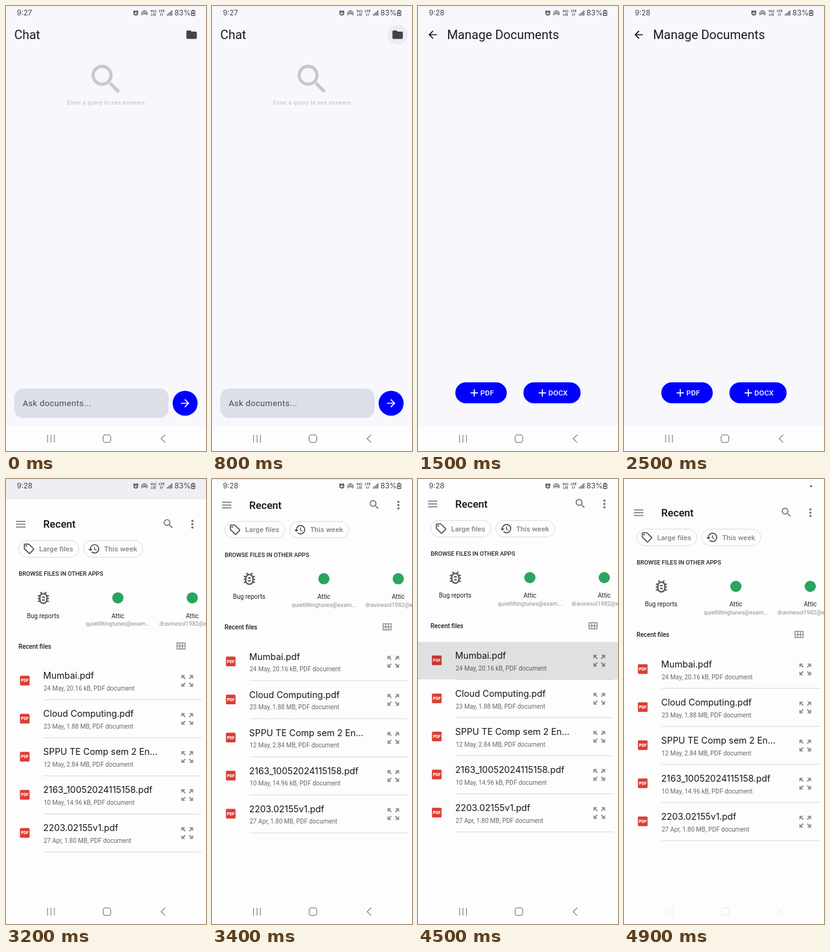
An HTML page with a canvas that plays this animation: 320 px wide and 713 px high, repeating every 5 s.

```html
<!DOCTYPE html>
<html lang="en">
<head>
<meta charset="utf-8">
<title>Document chat</title>
<style>
  html, body { margin: 0; width: 100%; height: 100%; overflow: hidden; background: #fdfdfd; }
  canvas { display: block; width: 320px; height: 713px; }
</style>
</head>
<body>
<canvas id="stage"></canvas>
<script>
const W = 320, H = 713, LOOP = 5000, STEP = 100, NAV_TOP = 673;
const SURFACE = '#f8f7fc', PAPER = '#fdfdfd', BLUE = '#0000ff', INK = '#1b1b1f';
const dpr = window.devicePixelRatio || 1;

const stage = document.getElementById('stage');
const buffer = document.createElement('canvas');
for (const c of [stage, buffer]) {
  c.width = Math.round(W * dpr);
  c.height = Math.round(H * dpr);
}
const screen2d = stage.getContext('2d');
const layer2d = buffer.getContext('2d');
let g = screen2d;

// Icon outlines on a 24 unit grid
const paths = {
  search: 'M15.5 14h-.79l-.28-.27C15.41 12.59 16 11.11 16 9.5 16 5.91 13.09 3 9.5 3S3 5.91 3 9.5 5.91 16 9.5 16c1.61 0 3.09-.59 4.23-1.57l.27.28v.79l5 4.99L20.49 19l-4.99-5zm-6 0C7.01 14 5 11.99 5 9.5S7.01 5 9.5 5 14 7.01 14 9.5 11.99 14 9.5 14z',
  folder: 'M10 4H4c-1.1 0-2 .9-2 2v12c0 1.1.9 2 2 2h16c1.1 0 2-.9 2-2V8c0-1.1-.9-2-2-2h-8z',
  forward: 'M12 4l-1.41 1.41L16.17 11H4v2h12.17l-5.58 5.59L12 20l8-8z',
  back: 'M20 11H7.83l5.59-5.59L12 4l-8 8 8 8 1.41-1.41L7.83 13H20z',
  plus: 'M19 13h-6v6h-2v-6H5v-2h6V5h2v6h6z',
  tag: 'M21.41 11.41l-8.83-8.83c-.37-.37-.88-.58-1.41-.58H4c-1.1 0-2 .9-2 2v7.17c0 .53.21 1.04.59 1.41l8.83 8.83c.78.78 2.05.78 2.83 0l7.17-7.17c.78-.78.78-2.04-.01-2.83zM12.83 20L4 11.17V4h7.17L20 12.83zM8 6.5a1.5 1.5 0 1 0-3 0a1.5 1.5 0 1 0 3 0z',
  history: 'M13 3a9 9 0 0 0-9 9H1l3.96 4.03L9 12H6c0-3.87 3.13-7 7-7s7 3.13 7 7-3.13 7-7 7c-1.93 0-3.68-.79-4.94-2.06l-1.42 1.42A8.95 8.95 0 0 0 13 21a9 9 0 0 0 0-18zm-1 5v5l4.28 2.54.72-1.21-3.5-2.08V8z',
  bug: 'M20 8h-2.81c-.45-.78-1.07-1.45-1.82-1.96L17 4.41 15.59 3l-2.17 2.17C12.96 5.06 12.49 5 12 5s-.96.06-1.41.17L8.41 3 7 4.41l1.62 1.63C7.88 6.55 7.26 7.22 6.81 8H4v2h2.09c-.05.33-.09.66-.09 1v1H4v2h2v1c0 .34.04.67.09 1H4v2h2.81c1.04 1.79 2.97 3 5.19 3s4.15-1.21 5.19-3H20v-2h-2.09c.05-.33.09-.66.09-1v-1h2v-2h-2v-1c0-.34-.04-.67-.09-1H20zm-4 7c0 2.21-1.79 4-4 4s-4-1.79-4-4v-4c0-2.21 1.79-4 4-4s4 1.79 4 4zm-6-1h4v2h-4zm0-4h4v2h-4z',
  expand: 'M15 3l2.3 2.3-2.89 2.87 1.42 1.42L18.7 6.7 21 9V3zM3 9l2.3-2.3 2.87 2.89 1.42-1.42L6.7 5.3 9 3H3zm6 12l-2.3-2.3 2.89-2.87-1.42-1.42L5.3 17.3 3 15v6zm12-6l-2.3 2.3-2.87-2.89-1.42 1.42 2.89 2.87L15 21h6z'
};
const icons = {};
for (const k in paths) icons[k] = new Path2D(paths[k]);

function icon(name, cx, cy, size, color) {
  g.save();
  g.translate(cx - size / 2, cy - size / 2);
  g.scale(size / 24, size / 24);
  g.fillStyle = color;
  g.fill(icons[name], 'evenodd');
  g.restore();
}

function text(str, x, y, size, color, o = {}) {
  g.font = `${o.weight || 400} ${size}px ${o.font || 'Roboto'}, sans-serif`;
  g.letterSpacing = (o.spacing || 0) + 'px';
  g.textAlign = o.align || 'left';
  g.fillStyle = color;
  g.fillText(str, x, y);
}

function rect(x, y, w, h, color) {
  g.fillStyle = color;
  g.fillRect(x, y, w, h);
}

function round(x, y, w, h, r) {
  g.beginPath();
  g.roundRect(x, y, w, h, r);
}

function pill(x, y, w, h, r, color) {
  round(x, y, w, h, r);
  g.fillStyle = color;
  g.fill();
}

function disc(x, y, r, color) {
  g.beginPath();
  g.arc(x, y, r, 0, Math.PI * 2);
  g.fillStyle = color;
  g.fill();
}

function line(points, color, width) {
  g.beginPath();
  points.forEach(([x, y], i) => i ? g.lineTo(x, y) : g.moveTo(x, y));
  g.strokeStyle = color;
  g.lineWidth = width;
  g.stroke();
}

function arc(x, y, r, from, to, color, width) {
  g.beginPath();
  g.arc(x, y, r, from, to);
  g.strokeStyle = color;
  g.lineWidth = width;
  g.stroke();
}

// Draws a group off screen and blends it as one
function layer(draw, alpha, dy = 0) {
  g = layer2d;
  g.setTransform(dpr, 0, 0, dpr, 0, 0);
  g.clearRect(0, 0, W, H);
  g.translate(0, dy);
  draw();
  g = screen2d;
  g.globalAlpha = alpha;
  g.drawImage(buffer, 0, 0, W, H);
  g.globalAlpha = 1;
}

// Cubic Bezier (.4, 0, .2, 1)
function ease(x) {
  if (x <= 0) return 0;
  if (x >= 1) return 1;
  let lo = 0, hi = 1;
  for (let i = 0; i < 24; i++) {
    const s = (lo + hi) / 2, r = 1 - s;
    if (1.2 * s * r * r + .6 * s * s * r + s * s * s < x) lo = s; else hi = s;
  }
  return 3 * lo * lo * (1 - lo) + lo * lo * lo;
}

// Steps since a start time, or -1 outside the span
const stepIn = (t, from, to) => t >= from && t < to ? (t - from) / STEP : -1;

function statusBar(t, alpha) {
  const c = '#444448';
  g.globalAlpha = alpha;
  text(t < 1100 ? '9:27' : '9:28', 17.5, 15.2, 11.6, c, { font: 'Inter' });
  // Alarm
  arc(207.7, 11.4, 3, 0, 7, c, 1.5);
  line([[207.7, 9.6], [207.7, 11.6], [209, 12.2]], c, 1);
  line([[203.8, 9.2], [206, 7.2]], c, 1.2);
  line([[209.4, 7.2], [211.6, 9.2]], c, 1.2);
  // Hotspot
  disc(221.5, 12, 1.2, c);
  arc(221.5, 12, 2.7, 2.4, 7.02, c, 1);
  arc(221.5, 12, 4.6, 2.4, 7.02, c, 1);
  text('Vo))', 236, 10.4, 5, c, { weight: 700, align: 'center' });
  text('LTE', 236, 15.8, 5, c, { weight: 700, align: 'center' });
  text('LTE', 249, 10.4, 5.6, c, { weight: 700, align: 'center' });
  line([[247.6, 11.6], [247.6, 15.4], [246.4, 14.2]], c, .8);
  line([[250.2, 15.6], [250.2, 11.8], [251.4, 13]], c, .8);
  for (let i = 0; i < 4; i++) rect(257.5 + i * 2.4, 13 - i * 2, 1.3, 2.4 + i * 2, c);
  text('83%', 269.5, 15.2, 11.8, c, { font: 'Inter' });
  round(296.7, 7.6, 5.4, 7.8, 1);
  g.strokeStyle = c;
  g.lineWidth = 1.2;
  g.stroke();
  rect(298.2, 6.2, 2.4, 1.2, c);
  g.globalAlpha = 1;
  // Charging bolt
  g.beginPath();
  [[299.9, 8.8], [297.6, 12], [299.1, 12], [298.8, 14], [301.1, 10.9], [299.6, 10.9]]
    .forEach(([x, y]) => g.lineTo(x, y));
  g.fillStyle = '#111';
  g.fill();
}

function navBar(alpha) {
  const c = '#858587';
  rect(0, NAV_TOP, W, H - NAV_TOP, PAPER);
  g.globalAlpha = alpha;
  for (const x of [66.5, 72, 77.5]) line([[x, 687], [x, 699.5]], c, 1.2);
  round(155.4, 687.2, 12.2, 12.2, 3.8);
  g.strokeStyle = c;
  g.lineWidth = 1.3;
  g.stroke();
  line([[254.8, 687], [248.2, 693.3], [254.8, 699.6]], c, 1.3);
  g.globalAlpha = 1;
}

function chat(t) {
  rect(0, 0, W, H, SURFACE);
  text('Chat', 13.2, 53, 20, INK);
  icon('folder', 297, 46, 20, '#43434d');
  const n = stepIn(t, 600, 900);
  if (n >= 0) disc(297, 46, n ? 16 : 10, `rgba(30,30,40,${[.06, .1, .05][n]})`);
  icon('search', 160.2, 117.5, 62.5, '#c9c9cb');
  text('Enter a query to see answers', 160, 158.4, 8.8, '#c9c9cd',
    { weight: 500, spacing: .42, align: 'center' });
  pill(13.3, 613, 246.7, 47, 14, '#dddfe8');
  text('Ask documents...', 26.7, 641, 13.33, '#44474f', { spacing: .417 });
  disc(286.6, 636.5, 20, BLUE);
  icon('forward', 286.6, 636.5, 20, '#fff');
}

function addButton(x, w, label) {
  pill(x, 603, w, 33.5, 16.75, BLUE);
  icon('plus', x + 30.3, 619.8, 20, '#fff');
  text(label, x + 40, 624, 11.67, '#fff', { weight: 500, spacing: .08 });
}

function manage(t) {
  rect(0, 0, W, H, SURFACE);
  icon('back', 23.5, 46, 20, INK);
  text('Manage Documents', 46.4, 53, 20, INK);
  addButton(59.7, 82.3, 'PDF');
  addButton(168.6, 91.6, 'DOCX');
  const n = stepIn(t, 2100, 2500);
  if (n >= 0) {
    g.save();
    round(59.7, 603, 82.3, 33.5, 16.75);
    g.clip();
    disc(100.8, 620, [25, 45, 60, 60][n], `rgba(255,255,255,${[.12, .16, .12, .05][n]})`);
    g.restore();
  }
}

function chip(x, w, name, label) {
  round(x, 66.3, w, 26.6, 13.3);
  g.strokeStyle = '#dadade';
  g.lineWidth = 1;
  g.stroke();
  icon(name, x + 16.5, 79.5, 20, '#4a4a4d');
  text(label, x + 32.6, 83.7, 11.67, '#87878a', { weight: 500 });
}

function account(x, mail, mailX, align) {
  disc(x, 158, 9, '#2ba45e');
  text('Attic', x, 190.3, 10, '#222', { align: 'center' });
  text(mail, mailX, 203, 9.17, '#8c8c8f', { align });
}

const files = [
  ['Mumbai.pdf', '24 May, 20.16 kB, PDF document'],
  ['Cloud Computing.pdf', '23 May, 1.88 MB, PDF document'],
  ['SPPU TE Comp sem 2 En...', '12 May, 2.84 MB, PDF document'],
  ['2163_10052024115158.pdf', '10 May, 14.96 kB, PDF document'],
  ['2203.02155v1.pdf', '27 Apr, 1.80 MB, PDF document']
];

function fileRow([name, info], i) {
  const y = 261 + i * 61;
  pill(22.3, y + 21.8, 15.4, 15.4, 1.5, '#dc3d35');
  text('PDF', 30, y + 32, 6.6, '#fff', { weight: 900, align: 'center' });
  text(name, 59.6, y + 27, 14.3, '#151517', { font: 'Inter' });
  text(info, 60.2, y + 45.6, 10, '#69696c');
  icon('expand', 290, y + 30, 25, '#929295');
  rect(60, y + 59.8, 253, 1, '#d6d8dc');
}

function picker(t) {
  rect(0, 0, W, H, PAPER);
  for (const y of [35.5, 40, 44.5]) line([[16, y], [31, y]], '#77777a', 1.6);
  text('Recent', 59.6, 46, 16.67, '#111', { weight: 500 });
  icon('search', 259.8, 39.5, 20, '#757578');
  for (const y of [34.7, 40, 45.3]) disc(298.2, y, 1.8, '#707073');
  chip(20.4, 96.4, 'tag', 'Large files');
  chip(124.4, 94.4, 'history', 'This week');
  text('BROWSE FILES IN OTHER APPS', 20.2, 123, 9.5, '#222', { weight: 500 });
  icon('bug', 59.8, 158, 26.7, '#5a5a5d');
  text('Bug reports', 59.4, 190.3, 10, '#222', { align: 'center' });
  account(179, 'quietliltingtunes@exam...', 179, 'center');
  account(298, 'dravinesol1982@exam...', 245.6, 'left');
  text('Recent files', 20, 239.3, 10, '#222', { weight: 500 });
  g.strokeStyle = '#8a8a8d';
  g.lineWidth = 1.4;
  g.strokeRect(273.6, 230.2, 13, 9.8);
  line([[273.6, 235.1], [286.6, 235.1]], '#8a8a8d', 1.3);
  for (const x of [278, 282.3]) line([[x, 230.2], [x, 240]], '#8a8a8d', 1.3);
  files.forEach(fileRow);
  const n = stepIn(t, 4100, 4600);
  if (n >= 0) {
    g.save();
    g.beginPath();
    g.rect(0, 261, W, 60);
    g.clip();
    disc(160, 291, 70 + n * 60, `rgba(0,0,0,${Math.min(.115, .03 * (n + 1))})`);
    g.restore();
  }
}

function render(t) {
  g = screen2d;
  g.setTransform(dpr, 0, 0, dpr, 0, 0);
  const fade = t < 1100 ? 0 : t > 1500 ? 1 : ease((t - 885) / 700);
  const exit = t < 4700 ? 0 : (t - 4600) / STEP;

  if (fade < 1) {
    chat(t);
    g.globalAlpha = fade;
    rect(0, 0, W, H, SURFACE);
    g.globalAlpha = 1;
  }
  if (fade > 0 && t < 3600) layer(() => manage(t), fade);
  if (t >= 3100) {
    const rise = t < 3600 ? 138 * Math.pow(.235, (t - 3100) / STEP) : 0;
    if (t < 3600) rect(0, 0, W, H, 'rgba(0,0,0,.035)');
    else rect(0, 0, W, H, PAPER);
    layer(() => picker(t), t < 3200 ? .8 : 1, rise + 14 * (exit / 3) ** 2);
  }
  statusBar(t, 1 - exit / 3);
  navBar(1 - .293 * exit);
}

const start = performance.now();
let shown = -1;
function tick() {
  const t = Math.floor(((performance.now() - start) % LOOP) / STEP) * STEP;
  if (t !== shown) render(shown = t);
  requestAnimationFrame(tick);
}
tick();
</script>
</body>
</html>
```
